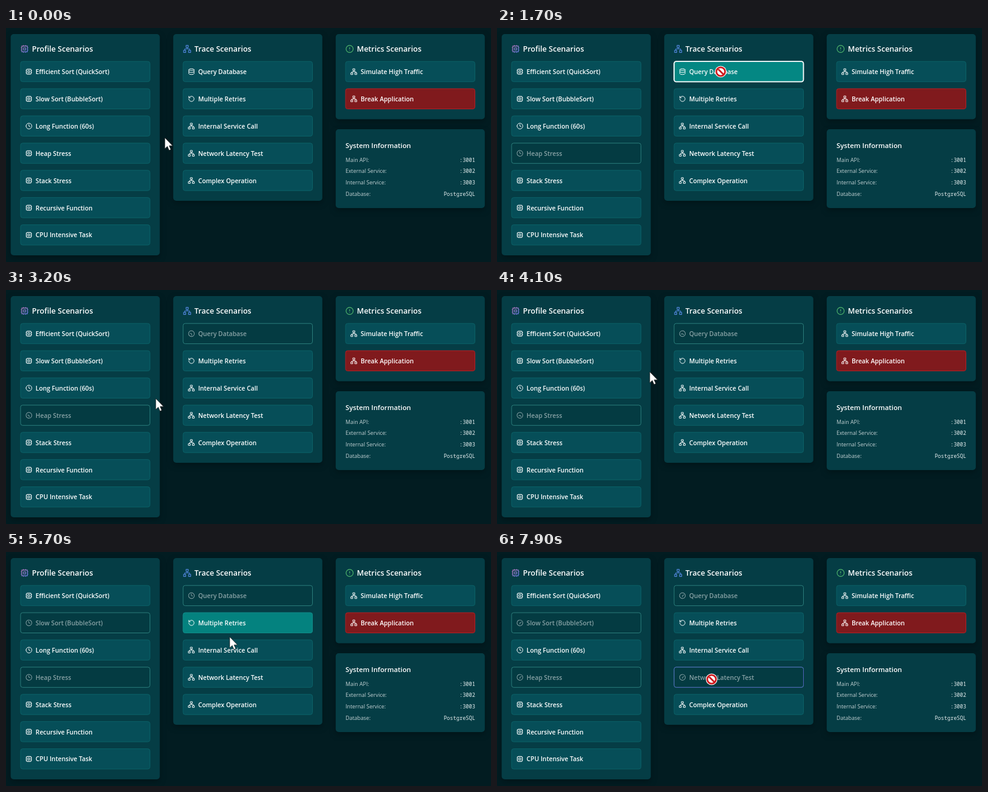
An HTML page that plays this animation: 800 px wide and 386 px high, repeating every 8 s.

```html
<!DOCTYPE html>
<html lang="en">
<head>
<meta charset="utf-8">
<title>Scenario dashboard</title>
<style>
html, body { margin: 0; width: 100%; height: 100%; overflow: hidden; background: #021c21; }
svg { display: block; width: 100vw; height: 100vh; }
text { font-family: "Open Sans", "Noto Sans", sans-serif; fill: #fff; }
.title { font-size: 12.55px; font-weight: 600; }
.subtitle { font-size: 11.3px; font-weight: 600; }
.label { font-size: 10.3px; font-weight: 600; }
.key { font-size: 8.9px; fill: #c3d2d4; }
.value { font: 8.7px "Noto Sans Mono", "DejaVu Sans Mono", monospace; fill: #e3eced; text-anchor: end; }
.panel { fill: #053d45; filter: drop-shadow(0 4px 5px #00101499); }
.base { fill: #064e58; stroke: #0b6167; }
.red .base { fill: #801a1d; stroke: #b32024; }
.hover { fill: #048783; stroke: #128f8b; }
.off { fill: #043b42; stroke: #2a7d7b; }
.ring { fill: none; stroke: #4f62b8; }
.focus { fill: none; stroke: #fff; stroke-width: 1.8px; }
.icon { fill: none; stroke: #fff; stroke-width: 2; stroke-linecap: round; stroke-linejoin: round; }
</style>
</head>
<body>
<svg id="stage" viewBox="0 0 800 386" preserveAspectRatio="none">
  <defs>
    <linearGradient id="violet" x2="1" y2="1">
      <stop stop-color="#c77bc0"/><stop offset="1" stop-color="#5a78e0"/>
    </linearGradient>
  </defs>
</svg>
<script>
const LOOP = 8000, FADE = 150, BTN_W = 214, BTN_H = 34;
const stage = document.getElementById('stage');

const CIRCLE = 'M2 12a10 10 0 1 0 20 0a10 10 0 1 0-20 0';
const box = (x, y, s) => `M${x} ${y}h${s}v${s}h${-s}z`;
const ICONS = {
  cpu: box(4, 4, 16) + box(9, 9, 6) + 'M15 2v2M15 20v2M2 15h2M2 9h2M20 15h2M20 9h2M9 2v2M9 20v2',
  clock: CIRCLE + 'M12 6v6l4 2',
  net: box(16, 16, 6) + box(2, 16, 6) + box(9, 2, 6) + 'M5 16v-3a1 1 0 0 1 1-1h12a1 1 0 0 1 1 1v3M12 12V8',
  db: 'M3 5a9 3 0 1 0 18 0a9 3 0 1 0-18 0v14a9 3 0 0 0 18 0V5M3 12a9 3 0 0 0 18 0',
  retry: 'M3 12a9 9 0 1 0 9-9 9.75 9.75 0 0 0-6.74 2.74L3 8M3 3v5h5',
  alert: CIRCLE + 'M12 8v4M12 16h.01'
};

function add(parent, tag, attrs, text) {
  const el = document.createElementNS('http://www.w3.org/2000/svg', tag);
  for (const k in attrs) el.setAttribute(k, attrs[k]);
  if (text) el.textContent = text;
  parent.append(el);
  return el;
}

const panel = (x, y, w, h) => add(stage, 'rect', { class: 'panel', x, y, width: w, height: h, rx: 5 });

// An icon centred on (x, y)
function icon(parent, name, x, y, size, style = '') {
  const g = add(parent, 'g', { transform: `translate(${x} ${y}) scale(${size / 24})` });
  return add(g, 'path', { class: 'icon', d: ICONS[name], transform: 'translate(-12 -12)', style });
}

// Each item: label, icon, click time (optional)
const buttons = [];
function column(x, height, title, mark, color, items) {
  panel(x, 10, 246, height);
  icon(stage, mark, x + 23, 34.5, 14, `stroke:${color}`);
  add(stage, 'text', { class: 'title', x: x + 35, y: 39 }, title);
  items.forEach(([label, name, click = Infinity], i) => {
    const bx = x + 16.3, by = 55.2 + i * 44.9;
    const g = add(stage, 'g', { class: label.startsWith('Break') ? 'red' : '' });
    const layer = c => add(g, 'rect', { class: c, x: bx, y: by, width: BTN_W - .6, height: BTN_H - .6, rx: 3.5 });
    const b = { x: bx, y: by, click };
    for (const c of ['base', 'hover', 'off', 'ring', 'focus']) b[c] = layer(c);
    b.content = add(g, 'g', {});
    b.icon = icon(b.content, name, bx + 13.8, by + 16.8, 11.4);
    b.spin = icon(b.content, 'clock', bx + 13.8, by + 16.8, 11.4);
    add(b.content, 'text', { class: 'label', x: bx + 24.8, y: by + 20.8 }, label);
    buttons.push(b);
  });
}

column(7.7, 365, 'Profile Scenarios', 'cpu', 'url(#violet)', [
  ['Efficient Sort (QuickSort)', 'cpu'],
  ['Slow Sort (BubbleSort)', 'cpu', 4500],
  ['Long Function (60s)', 'clock'],
  ['Heap Stress', 'cpu', 820],
  ['Stack Stress', 'cpu'],
  ['Recursive Function', 'cpu'],
  ['CPU Intensive Task', 'cpu']
]);
column(275.8, 275, 'Trace Scenarios', 'net', '#4f83d6', [
  ['Query Database', 'db', 1620],
  ['Multiple Retries', 'retry'],
  ['Internal Service Call', 'net'],
  ['Network Latency Test', 'net', 7450],
  ['Complex Operation', 'net']
]);
column(543.8, 140.5, 'Metrics Scenarios', 'alert', '#4fb56c', [
  ['Simulate High Traffic', 'net'],
  ['Break Application', 'net']
]);

panel(543.8, 167, 246, 130);
add(stage, 'text', { class: 'subtitle', x: 560, y: 197.5 }, 'System Information');
[['Main API:', ':3001'], ['External Service:', ':3002'], ['Internal Service:', ':3003'], ['Database:', 'PostgreSQL']]
  .forEach(([key, value], i) => {
    const y = 220.5 + i * 18.9;
    add(stage, 'text', { class: 'key', x: 560, y }, key);
    add(stage, 'text', { class: 'value', x: 774, y }, value);
  });

const arrow = add(stage, 'path', {
  d: 'M0 0V18.2L4.2 14.3L7 20.8L10 19.5L7.2 13.2H12.8Z',
  fill: '#fff', stroke: '#1a1a1a', 'stroke-width': .7
});
const denied = add(stage, 'g', {});
add(denied, 'circle', { r: 9.6, fill: '#fff' });
add(denied, 'path', {
  d: 'M-7.2 0a7.2 7.2 0 1 0 14.4 0a7.2 7.2 0 1 0-14.4 0M-5-5L5 5',
  fill: 'none', stroke: '#cf1b1f', 'stroke-width': 2.8
});

// Pointer stops: time, x, y
const PATH = [
  [0, 262, 181], [100, 262, 181], [600, 205.5, 203], [1020, 205.5, 203], [1480, 369, 72],
  [2250, 369, 72], [2750, 284, 94], [3200, 247, 179], [3550, 252, 262], [4100, 252, 135],
  [4400, 221.5, 112], [4950, 221.5, 112], [5320, 270, 235], [5410, 338, 246], [5530, 366, 125],
  [5640, 368, 128], [5700, 369, 140], [6150, 356, 203], [6900, 352, 211], [7350, 354, 210], [8000, 354, 210]
];

const clamp = v => Math.max(0, Math.min(1, v));

function pointer(t) {
  t = Math.max(0, t);
  const i = Math.max(1, PATH.findIndex(p => p[0] >= t));
  const [t0, x0, y0] = PATH[i - 1], [t1, x1, y1] = PATH[i];
  let k = (t - t0) / (t1 - t0);
  k *= k * (3 - 2 * k);
  return [x0 + (x1 - x0) * k, y0 + (y1 - y0) * k];
}

const hits = (b, [x, y]) => x >= b.x && x <= b.x + BTN_W && y >= b.y && y <= b.y + BTN_H;

function draw(now) {
  const t = now % LOOP;
  const pos = pointer(t);
  const trail = Array.from({ length: 15 }, (_, i) => pointer(t - i * FADE / 15));
  let blocked = false;

  for (const b of buttons) {
    const age = t - b.click;
    const off = clamp((age - 150) / FADE);
    const hover = clamp(1.25 * trail.filter(p => hits(b, p)).length / trail.length);
    if (age >= 0 && hits(b, pos)) blocked = true;
    b.base.style.opacity = 1 - off;
    b.hover.style.opacity = hover * (1 - off);
    b.off.style.opacity = off;
    b.ring.style.opacity = off * clamp((800 - age) / FADE);
    b.focus.style.opacity = age >= 0 ? 1 - off : 0;
    b.content.style.opacity = 1 - .48 * off;
    b.icon.style.display = off ? 'none' : '';
    b.spin.style.display = off ? '' : 'none';
    b.spin.setAttribute('transform', `rotate(${(t - 5730) * .36}) translate(-12 -12)`);
  }

  arrow.style.display = blocked ? 'none' : '';
  denied.style.display = blocked ? '' : 'none';
  (blocked ? denied : arrow).setAttribute('transform', `translate(${pos})`);
  requestAnimationFrame(() => draw(performance.now()));
}
draw(0);
</script>
</body>
</html>
```
